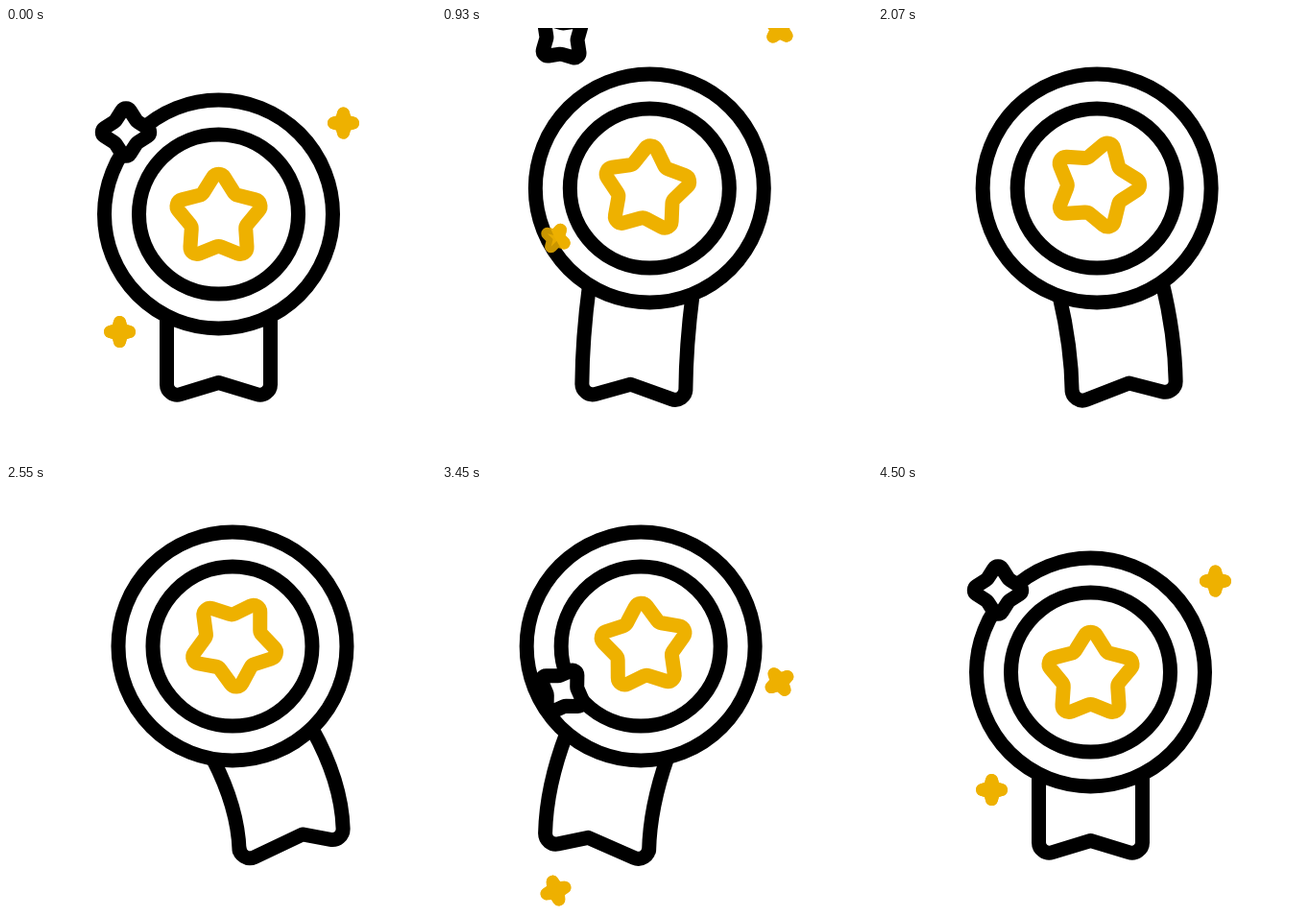
Write an HTML page with a canvas that moves like this. It is 448 px wide and 448 px high and loops after 4530 ms.

```html
<!DOCTYPE html>
<html lang="en">
<head>
<meta charset="utf-8">
<title>Award badge</title>
<style>
html, body { margin: 0; width: 100%; height: 100%; overflow: hidden; background: #fff; }
canvas { display: block; width: 448px; height: 448px; }
</style>
</head>
<body>
<canvas id="stage" width="448" height="448"></canvas>
<script>
const ctx = document.getElementById('stage').getContext('2d');
const LOOP = 4530, STEP = 30, LINE = 15;
const GOLD = '#eeb100', BLACK = '#000';
const CENTER = { x: 221.5, y: 194 };

// Eased progress from 0 to 1 between two times
function ease(t, from, to) {
  const u = Math.min(1, Math.max(0, (t - from) / (to - from)));
  return u * u * (3 - 2 * u);
}

function swingAt(t) {
  return -ease(t, 600, 1500) + 2 * ease(t, 1500, 2400)
    - 2 * ease(t, 2400, 3300) + ease(t, 3300, 3900);
}

function stroke(color, width = LINE) {
  ctx.strokeStyle = color;
  ctx.lineWidth = width;
  ctx.lineJoin = 'round';
  ctx.stroke();
}

function circle(x, y, r) {
  ctx.beginPath();
  ctx.arc(x, y, r, 0, 2 * Math.PI);
  stroke(BLACK);
}

function starPath(tips, outer, inner, rounding) {
  const n = tips * 2;
  const point = i => {
    const r = i % 2 ? inner : outer;
    const a = Math.PI * i / tips - Math.PI / 2;
    return [r * Math.cos(a), r * Math.sin(a)];
  };
  const [ax, ay] = point(n - 1), [bx, by] = point(0);
  ctx.beginPath();
  ctx.moveTo((ax + bx) / 2, (ay + by) / 2);
  for (let i = 0; i < n; i++) ctx.arcTo(...point(i), ...point(i + 1), rounding);
  ctx.closePath();
}

function placed(x, y, degrees, draw) {
  ctx.save();
  ctx.translate(x, y);
  ctx.rotate(degrees * Math.PI / 180);
  draw();
  ctx.restore();
}

function ribbon(cx, cy, lift, swing) {
  const bend = swing > 0 ? swing * 1.25 : swing;
  const tilt = -16 * bend * Math.PI / 180;
  const side = dir => {
    const x = 54 * dir, y = 106;
    const top = {
      x: cx + x * Math.cos(tilt) - y * Math.sin(tilt),
      y: cy + x * Math.sin(tilt) + y * Math.cos(tilt)
    };
    const corner = {
      x: CENTER.x + x + 71 * bend,
      y: 386 + 3.2 * lift - 6 * bend * bend - 11 * bend * dir
    };
    const mid = { x: corner.x + 0.05 * (top.x - corner.x), y: (top.y + corner.y) / 2 - 4 };
    return { top, corner, mid, end: corner.y - 14 };
  };
  const l = side(-1), r = side(1);
  const notch = { x: CENTER.x + 82 * bend, y: 369.5 + 2.5 * lift - 8 * bend * bend };
  ctx.beginPath();
  ctx.moveTo(l.top.x, l.top.y);
  ctx.quadraticCurveTo(l.mid.x, l.mid.y, l.corner.x, l.end);
  ctx.arcTo(l.corner.x, l.corner.y, notch.x, notch.y, 11);
  ctx.lineTo(notch.x, notch.y);
  ctx.arcTo(r.corner.x, r.corner.y, r.corner.x, r.end, 11);
  ctx.lineTo(r.corner.x, r.end);
  ctx.quadraticCurveTo(r.mid.x, r.mid.y, r.top.x, r.top.y);
  stroke(BLACK);
}

function badge(t) {
  const lift = ease(t, 0, 600) - ease(t, 3900, 4500);
  const swing = swingAt(t);
  const x = CENTER.x + 17 * swing, y = CENTER.y - 27 * lift;
  ribbon(x, y, lift, swing);
  circle(x, y, 119);
  circle(x, y, 83);

  // The star circles slightly around the badge centre while it spins
  const orbit = 2 * Math.PI * t / 4500;
  const starX = x - 3.3 * Math.sin(orbit), starY = y + 3.5 * Math.cos(orbit);
  placed(starX, starY, 360 * ease(t, 700, 3640), () => {
    starPath(5, 51.5, 29.5, 7);
    stroke(GOLD);
  });
}

function goldSparkle(x, y, turn) {
  placed(x, y, turn, () => {
    starPath(4, 10, 3, 0);
    ctx.fillStyle = GOLD;
    ctx.fill();
    stroke(GOLD, 13);
  });
}

function goldSparkles(shift, turn) {
  goldSparkle(351.5, 99 + shift, -0.8 * turn);
  goldSparkle(118.5, 316.5 + shift, -turn);
}

function whiteSparkle(shift, turn) {
  placed(125, 108.5 + shift, 0.8 * turn, () => {
    starPath(4, 29, 16, 5);
    ctx.fillStyle = '#fff';
    ctx.fill();
    stroke(BLACK);
  });
}

function render(t) {
  ctx.fillStyle = '#fff';
  ctx.fillRect(0, 0, 448, 448);

  const leaving = t < 1500;
  const visible = leaving || t > 3000;
  const progress = leaving ? ease(t, 0, 1500) : ease(t, 3000, 4500) - 1;
  const shift = -(leaving ? 144 : 134) * progress;
  const turn = 90 * progress;

  // Gold sparkles fade only where they cross the badge
  if (visible) goldSparkles(shift, turn);
  badge(t);
  if (visible) {
    const age = Math.min(1, Math.max(0, leaving ? t : 4500 - t) / 1500);
    ctx.globalAlpha = 1 - age ** 4;
    goldSparkles(shift, turn);
    ctx.globalAlpha = 1;
    whiteSparkle(shift, turn);
  }
}

const start = performance.now();
function tick() {
  const t = (performance.now() - start) % LOOP;
  render(Math.floor(t / STEP) * STEP);
  requestAnimationFrame(tick);
}
tick();
</script>
</body>
</html>
```
